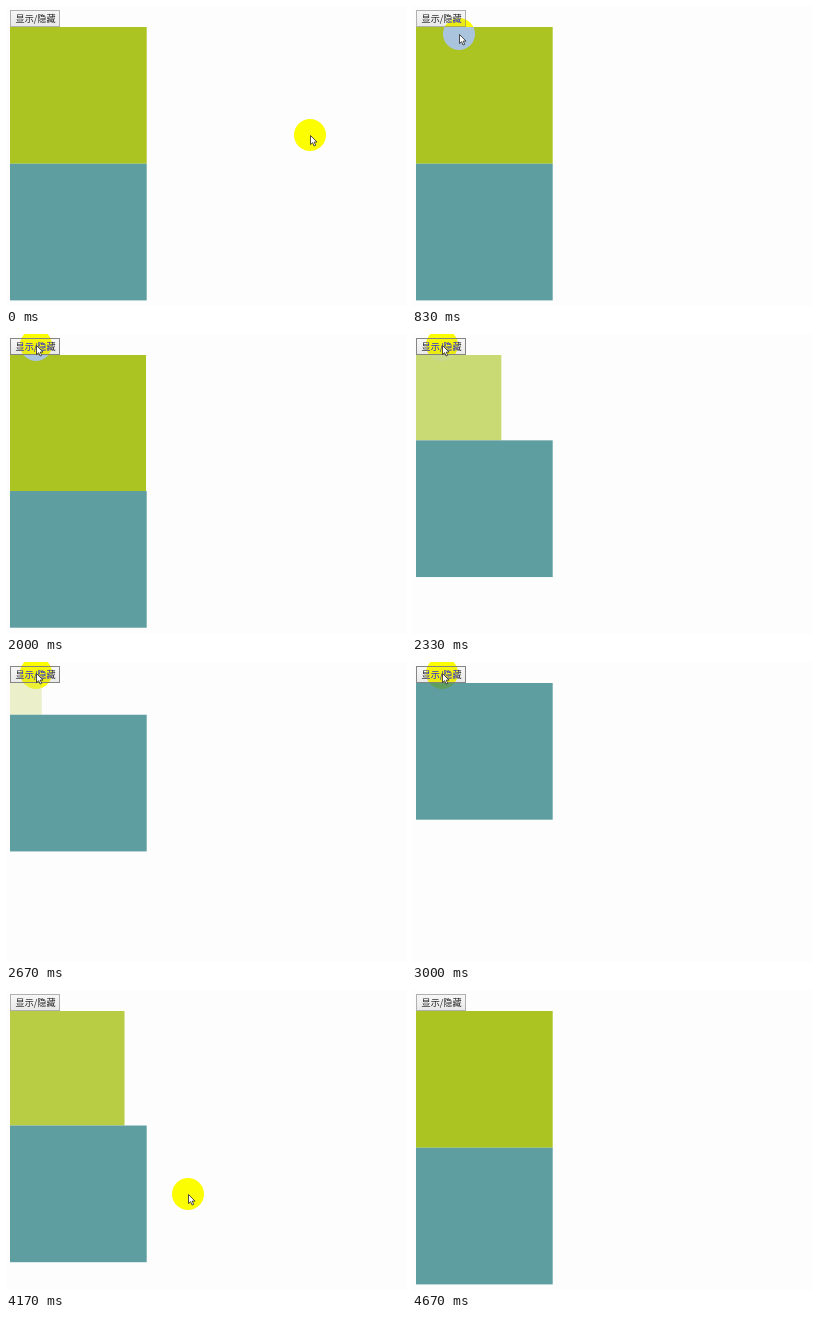
Animation of 400x300 px, one loop 6340 ms. Source, as an HTML page:

```html
<!DOCTYPE html>
<html lang="zh">
<head>
<meta charset="utf-8">
<style>
  html, body { margin: 0; width: 100%; height: 100%; overflow: hidden; background: #fdfdfd; }
  svg { display: block; width: 400px; height: 300px; isolation: isolate; }
  text { font: 9.1px "Noto Sans CJK SC", "Noto Sans CJK", sans-serif; fill: #222; }
  #spot { mix-blend-mode: difference; }
</style>
</head>
<body>
<svg viewBox="0 0 400 300">
  <defs>
    <linearGradient id="face" x2="0" y2="1">
      <stop stop-color="#f7f7f7"/>
      <stop offset="1" stop-color="#e9e9e9"/>
    </linearGradient>
  </defs>
  <rect width="400" height="300" fill="#fdfdfd"/>
  <rect id="button" x="4.5" y="4.5" width="49" height="16" fill="url(#face)"/>
  <text x="9.6" y="16.2">显示/隐藏</text>
  <rect id="green" x="4" y="21" fill="#abc421"/>
  <rect id="teal" x="4" width="136.7" height="136.7" fill="#5f9ea0"/>
  <circle id="spot" r="16" fill="#00f"/>
  <path id="arrow" d="M.5 .5V9.6L2.6 7.7 4.1 11 5.7 10.3 4.2 7.1H7Z"
        fill="#fff" stroke="#222" stroke-width=".8"/>
</svg>
<script>
const LOOP = 6340, FPS = 6, SIDE = 136.7;

const openness = [[11.8, 1], [12, .955], [14, .58], [15, .48], [18, 0],
                  [20.6, 0], [25, .736], [26.58, 1]];
const pointer = [[1, 304, 129], [2, 288, 122], [3, 205, 86], [4, 104, 48], [5, 47, 28],
                 [6, 37, 18], [8, 30, 11], [22, 30, 11], [23, 48, 38], [24, 118, 130],
                 [25, 182, 204]];
const POINTER_GONE = 28;

const $ = id => document.getElementById(id);
const set = (id, attrs) => {
  for (const name in attrs) $(id).setAttribute(name, attrs[name]);
};
const swing = u => .5 - Math.cos(u * Math.PI) / 2;

function sample(track, step) {
  const next = track.findIndex(key => key[0] > step);
  if (next === 0) return track[0].slice(1);
  if (next < 0) return track[track.length - 1].slice(1);
  const a = track[next - 1], b = track[next];
  const f = (step - a[0]) / (b[0] - a[0]);
  return a.slice(1).map((v, i) => v + (b[i + 1] - v) * f);
}

function draw(ms) {
  const step = Math.floor((ms % LOOP + 4) * FPS / 1000);
  const shown = swing(sample(openness, step)[0]);
  const size = SIDE * shown;
  set('green', { width: size, height: size, opacity: shown });
  set('teal', { y: 21 + size });

  const [x, y] = sample(pointer, step);
  const place = {
    transform: `translate(${x} ${y})`,
    visibility: step < POINTER_GONE ? 'visible' : 'hidden'
  };
  set('spot', place);
  set('arrow', place);
  set('button', { stroke: x < 54 && y < 21 ? '#858585' : '#b0b0b0' });
}

const start = performance.now();
function tick() {
  draw(performance.now() - start);
  requestAnimationFrame(tick);
}
tick();
</script>
</body>
</html>
```
